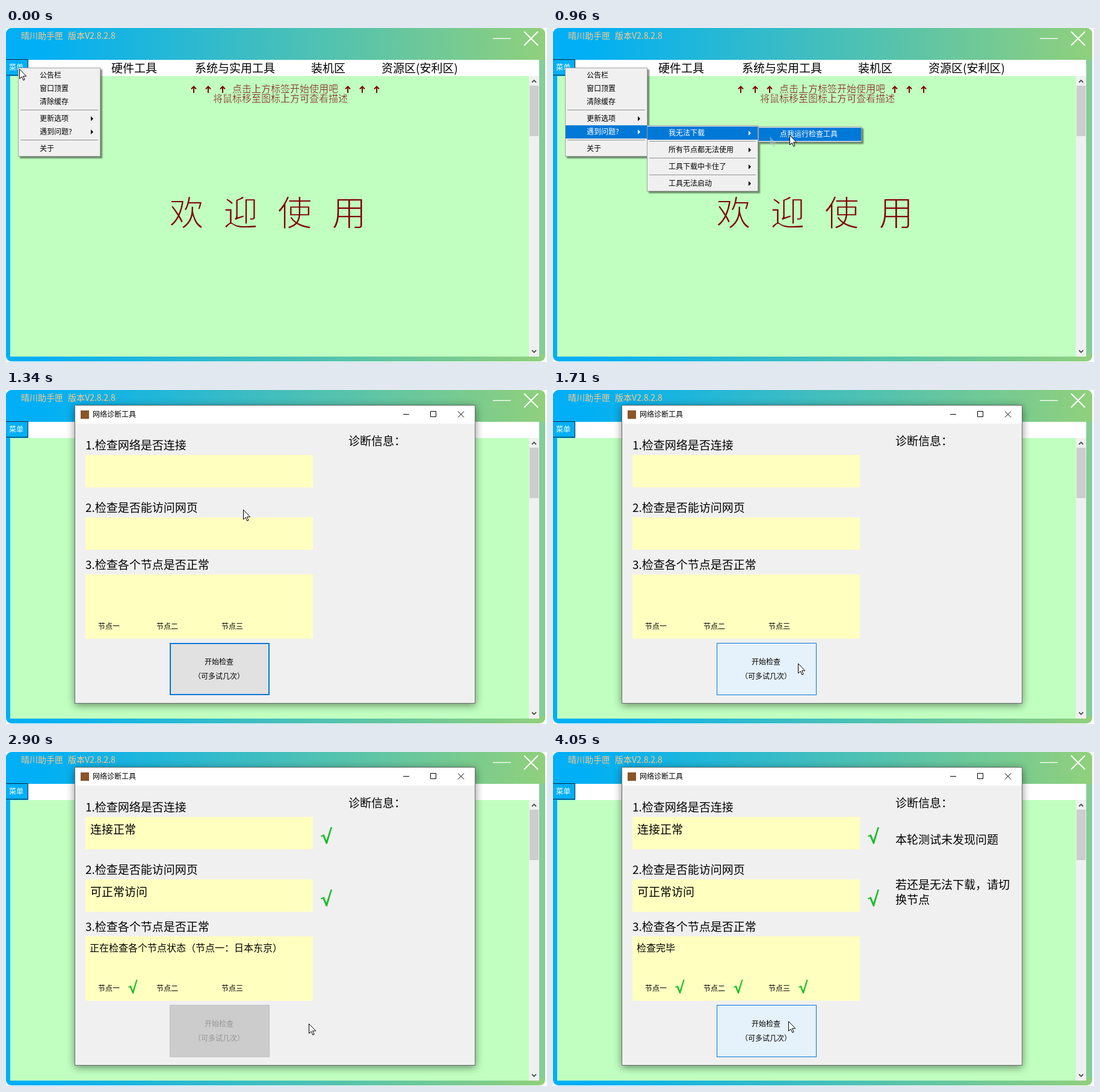
Write an HTML page that moves like this. It is 899 by 556 pixels and loops after 4130 ms.

```html
<!DOCTYPE html>
<html lang="zh-CN">
<head>
<meta charset="utf-8">
<style>
html, body { margin: 0; width: 100%; height: 100%; overflow: hidden; background: #fff; }
svg { display: block; font-family: "Noto Sans CJK SC", "Noto Sans CJK", "Noto Sans", sans-serif; }
text { white-space: pre; }
.pop { filter: drop-shadow(3px 3px 1px #0007); }
.cast { filter: drop-shadow(0 3px 7px #0007); }
</style>
</head>
<body>
<svg id="stage" width="899" height="556" viewBox="0 0 899 556"></svg>
<script>
const LOOP = 4130;
const MAROON = '#800000', GREEN = '#c0ffc0', BLUE = '#0078d7';
const stage = document.getElementById('stage');

// Pointer moves: start, end, number of steps, where it goes
const start = { x: 22, y: 68 };
const moves = [
  { from: 80, to: 390, n: 5, x: 103, y: 181 },
  { from: 550, to: 710, n: 3, x: 329, y: 179 },
  { from: 880, to: 960, n: 2, x: 393, y: 178 },
  { from: 1190, to: 1260, n: 2, x: 393, y: 178 },
  { from: 1330, to: 1710, n: 6, x: 407, y: 455 },
  { from: 1880, to: 1960, n: 2, x: 407, y: 455 },
  { from: 2510, to: 2900, n: 6, x: 503, y: 452 },
  { from: 2980, to: 3050, n: 2, x: 515, y: 450 },
  { from: 3300, to: 3510, n: 4, x: 506, y: 449 },
  { from: 3660, to: 4050, n: 6, x: 391, y: 448 }
];

const ease = p => p * p * (3 - 2 * p);

// The last step taken at this time, with the pointer's place
function stepAt(time) {
  const k = moves.findLastIndex(m => m.from <= time);
  if (k < 0) return { t: 0, ...start };
  const m = moves[k], prev = moves[k - 1] || start;
  const i = Math.floor(Math.min(1, (time - m.from) / (m.to - m.from)) * (m.n - 1));
  const p = ease((i + 1) / m.n);
  return {
    t: m.from + (m.to - m.from) * i / (m.n - 1),
    x: Math.round(prev.x + (m.x - prev.x) * p),
    y: Math.round(prev.y + (m.y - prev.y) * p)
  };
}

const rect = (x, y, w, h, fill, more = '') =>
  `<rect x="${x}" y="${y}" width="${w}" height="${h}" fill="${fill}" ${more}/>`;
const frame = (x, y, w, h, fill, stroke, width = 1) =>
  rect(x + width / 2, y + width / 2, w - width, h - width, fill, `stroke="${stroke}" stroke-width="${width}"`);
const line = (d, stroke, width = 1) =>
  `<path d="${d}" fill="none" stroke="${stroke}" stroke-width="${width}"/>`;
// y is the middle of the line of text
const text = (x, y, size, str, fill = '#000', more = '') =>
  `<text x="${x}" y="${Math.round(y + size * 0.36 + 0.6)}" font-size="${size}" fill="${fill}" ${more}>${str}</text>`;
// Thin strokes: the outline in the ground colour eats into the letters
const thin = (x, y, size, str, cut) =>
  text(x, y, size, str, MAROON, `stroke="${GREEN}" stroke-width="${cut}"`);
const pointer = (x, y, more = 'fill="#fff" stroke="#000"') =>
  `<path transform="translate(${x + 0.5} ${y + 0.5})" d="M0 0V16L3.7 12.6 6.3 18.5 8.6 17.5 6 11.7H11.2Z" ${more}/>`;
const check = (x, y, scale = 1) =>
  `<path transform="translate(${x} ${y}) scale(${scale})" d="M0 14.5 5.5 12 9.5 22 16.5 0H19L10.8 28H8.8L3.6 15.2 .6 16.3Z" fill="#17bd28"/>`;
const inside = (p, x, y, w, h) => p.x >= x && p.x < x + w && p.y >= y && p.y < y + h;

function mainWindow() {
  let out = `<defs><linearGradient id="sky"><stop offset=".06" stop-color="#00aff5"/>
    <stop offset="1" stop-color="#90d07c"/></linearGradient></defs>` +
    rect(0, 0, 896, 555, 'url(#sky)', 'rx="9"') + rect(886, 53, 10, 490, '#83ce9a') +
    text(25, 12, 14, '晴川助手匣', '#fdca8c') + text(103, 12, 14, '版本V2.8.2.8', '#fdca8c') +
    line('M809 17.5H839', '#fff', 1.3) + line('M861 6 884 29M884 6 861 29', '#fff', 2) +
    rect(37, 53, 849, 27, '#fff') +
    rect(0, 52, 37, 27, '#00aff5') + line('M0 52.5H36.5V78.5H0', '#0b2a48') +
    text(5, 65, 12, '菜单', '#fff') +
    text(175, 67, 19, '硬件工具') + text(314, 67, 19, '系统与实用工具') +
    text(507, 67, 19, '装机区') + text(624, 67, 19, '资源区(安利区)') +
    rect(7, 80, 862, 467, GREEN) +
    rect(869, 80, 17, 467, '#f0f0f0') + rect(870, 96, 15, 84, '#cdcdcd') +
    line('M874 90.5 877.5 87 881 90.5M874 536.5 877.5 540 881 536.5', '#505050', 1.8) +
    thin(376, 101, 16, '点击上方标签开始使用吧', 0.4) +
    thin(344, 117, 16, '将鼠标移至图标上方可查看描述', 0.4);
  for (let i = 0; i < 3; i++)
    for (const x of [312, 568]) out += line(`M${x + 24 * i} 108v-11m-4 4.5 4-4 4 4`, MAROON, 2);
  [...'欢迎使用'].forEach((c, i) => out += thin(271 + 90 * i, 308, 58, c, 1.8));
  return out;
}

// Rows run from top to bottom; '-' is a rule, '>' after a label opens a submenu
function menu(x, y, w, rows, isLit) {
  let top = y + 2, body = '';
  for (const row of rows) {
    if (row === '-') {
      body += line(`M${x + 4} ${top + 2.5}H${x + w - 4}`, '#909090');
      top += 6;
      continue;
    }
    const label = row.replace('>', ''), lit = isLit(label, top);
    const ink = lit ? '#fff' : '#000';
    if (lit) body += rect(x + 1, top, w - 2, 22, BLUE);
    body += text(x + 36, top + 10, 12, label, ink);
    if (label !== row) body += `<path d="M${x + w - 16} ${top + 7}v8l4-4Z" fill="${ink}"/>`;
    top += 22;
  }
  return `<g class="pop">${frame(x, y, w, top + 2 - y, '#f0f0f0', '#a0a0a0')}</g>${body}`;
}

function menus(step) {
  const { t } = step;
  let out = menu(20, 66, 137, ['公告栏', '窗口顶置', '清除缓存', '-', '更新选项>', '遇到问题?>', '-', '关于'],
    (label, top) => t >= 390 ? label === '遇到问题?' : inside(step, 30, top, 127, 22));
  if (t >= 390) out += menu(156, 162, 185,
    ['我无法下载>', '-', '所有节点都无法使用>', '-', '工具下载中卡住了>', '-', '工具无法启动>'],
    label => t >= 630 && label === '我无法下载');
  if (t >= 710) out += menu(341, 164, 172, ['点我运行检查工具'], () => t >= 880);
  if (t >= 960) out += pointer(360, 180, 'fill="#b5c4cc" opacity=".5"');
  return out;
}

function button(step) {
  const { t } = step, box = [272, 421, 166, 87];
  const off = t >= 1880 && t < 3660;
  const look = off ? ['#ccc', '#bfbfbf'] : inside(step, ...box) ? ['#e5f1fb', BLUE] :
    t < 1880 ? ['#e1e1e1', BLUE, 2] : ['#e1e1e1', '#adadad'];
  const ink = off ? '#959595' : '#000', mid = 'text-anchor="middle"';
  return frame(...box, ...look) +
    text(354, 452, 12, '开始检查', ink, mid) + text(354, 476, 12, '（可多试几次）', ink, mid);
}

function section(y, h, title) {
  return text(132, y - 16, 19, title) + rect(132, y, 378, h, '#ffffc0');
}

const nodes = [
  { name: '节点一', x: 153, at: 2820, city: '日本东京' },
  { name: '节点二', x: 250, at: 2980, city: '日本大阪' },
  { name: '节点三', x: 358, at: 3300, city: '日本福冈' }
];

function results(t) {
  const done = t >= 3660;
  const node = nodes.findLast(n => t >= n.at) || nodes[0];
  let out = nodes.map(n => text(n.x, 393, 12, n.name) + (t >= n.at ? check(n.x + 50, 379, 0.82) : '')).join('');
  if (t >= 1880) out += text(140, 129, 19, '连接正常');
  if (t >= 1960) out += check(523, 125);
  if (t >= 2510) out += text(140, 233, 19, '可正常访问') + check(523, 229);
  if (t >= 2580) out += text(139, 326, 16,
    done ? '检查完毕' : `正在检查各个节点状态（${node.name}：${node.city}）`);
  if (done) out += text(569, 146, 19, '本轮测试未发现问题') +
    text(569, 221, 19, '若还是无法下载，请切') + text(569, 246, 19, '换节点');
  return out;
}

function dialog(step) {
  const { t } = step;
  // Opens by fading in while growing to full size
  const rest = Math.max(0, 1 - (t - 1190) / 100);
  return `<g opacity="${1 - 0.15 * rest}" transform="translate(447 273.5) scale(${1 - 0.006 * rest}) translate(-447 -273.5)">` +
    `<g class="cast">${frame(114, 25, 666, 497, '#f0f0f0', '#66706a')}</g>` +
    rect(115, 26, 664, 30, '#fff') + rect(124, 34, 14, 14, '#8a5528') +
    text(144, 40, 12, '网络诊断工具') +
    line('M660 40.5H670M705.5 35.5H714.5V44.5H705.5ZM751 35.5 761 45.5M761 35.5 751 45.5', '#000') +
    section(108, 54, '1.检查网络是否连接') +
    section(212, 54, '2.检查是否能访问网页') +
    section(307, 107, '3.检查各个节点是否正常') +
    text(569, 85, 19, '诊断信息：') + button(step) + results(t) + '</g>';
}

const backdrop = mainWindow();
let shown;

function draw(now) {
  const step = stepAt(now % LOOP);
  if (step.t !== shown) {
    shown = step.t;
    stage.innerHTML = backdrop + (step.t < 1190 ? menus(step) : dialog(step)) + pointer(step.x, step.y);
  }
  requestAnimationFrame(draw);
}
draw(0);
</script>
</body>
</html>
```
